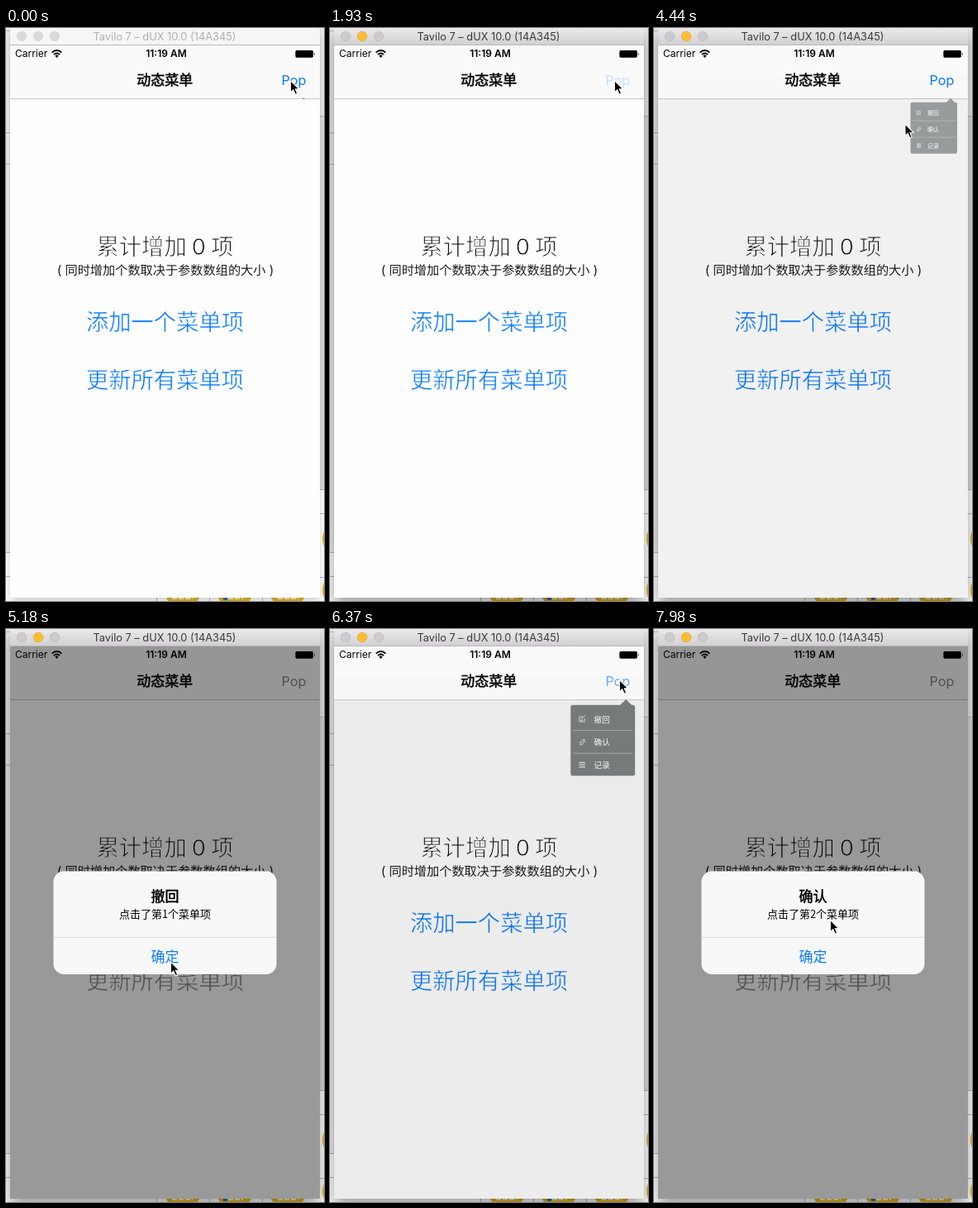
Animation, 385 px wide and 692 px high, one loop 8 s. Source, as an HTML page:

```html
<!DOCTYPE html>
<html lang="zh">
<head>
<meta charset="utf-8">
<title>动态菜单</title>
<style>
html, body { margin: 0; width: 100%; height: 100%; overflow: hidden; background: #e6e6e6; }
svg { display: block; font-family: "Noto Sans CJK SC", "Noto Sans CJK", sans-serif; }
text { white-space: pre; }
.mid { text-anchor: middle; }
.latin { font-family: Inter, "Liberation Sans", sans-serif; }
/* a page-coloured outline thins the strokes to a light weight */
.light { font-size: 27.3px; stroke: #fefefe; stroke-width: .55; }
.thin { stroke-width: .95; }
.semibold { font-size: 17px; stroke: #000; stroke-width: .5; }
</style>
</head>
<body>
<svg width="385" height="692" viewBox="0 0 385 692">
  <defs>
    <linearGradient id="bar" x2="0" y2="1">
      <stop stop-color="#ebe9eb"/><stop offset="1" stop-color="#d2d0d2"/>
    </linearGradient>
  </defs>

  <!-- desktop behind the window -->
  <rect width="385" height="692" fill="#ececec"/>
  <path fill="#dedede" d="M380 107h5v450h-5z"/>
  <path fill="#fff" d="M182 558h203v134H182zM0 634h182v58H0z"/>
  <g id="badges" fill="#e5b622"></g>
  <path stroke="#b4b4b4" fill="none" d="M0 3.5h5M0 126.5h5M0 164.5h5M0 633.5h5M0 662.5h5M380 106.5h5M380 557.5h5M380 586.5h5M380 663.5h5M182.5 688v4M246.5 688v4M310.5 688v4"/>

  <!-- window -->
  <path id="frame" d="M5 4q0-4 4-4h367q4 0 4 4v684H5z" fill="#fefefe"/>
  <path id="titleBar" d="M5 20V4q0-4 4-4h367q4 0 4 4v16z"/>
  <path d="M5 20.5h375" stroke="#b8b8b8"/>
  <g stroke-width=".6">
    <circle class="dot" cx="19" cy="10" r="5.8"/>
    <circle class="dot" cx="39" cy="10" r="5.8"/>
    <circle class="dot" cx="59" cy="10" r="5.8"/>
  </g>
  <text id="winTitle" class="latin mid" x="192" y="14.7" font-size="12.8">Tavilo 7 – dUX 10.0 (14A345)</text>

  <!-- navigation and status bars -->
  <path fill="#fafafa" d="M5 21h375v64H5z"/>
  <path d="M5 85.5h375" stroke="#c6c6c8"/>
  <text class="latin" x="11" y="35.3" font-size="12">Carrier</text>
  <text class="latin mid" x="194" y="35.3" font-size="12" font-weight="600">11:19 AM</text>
  <g fill="none" stroke="#000" stroke-width="1.8">
    <path d="M55.6 29.6q5.9-5.2 11.8 0M57.9 32q3.6-3 7.2 0"/>
    <path fill="#000" stroke="none" d="M59.4 33.4q2.1-1.6 4.2 0L61.5 36z"/>
  </g>
  <rect x="350.4" y="27" width="21.6" height="8.8" rx="1.8"/>
  <path d="M373 29.6q1.8 1.8 0 3.6z"/>
  <text class="semibold mid" x="192.3" y="69.3">动态菜单</text>

  <!-- page -->
  <text class="light thin mid" x="192.5" y="274.2">累计增加 <tspan class="latin">0</tspan> 项</text>
  <text class="latin mid" x="193" y="297.8" font-size="15.2" fill="#1c1c1c">( 同时增加个数取决于参数数组的大小 )</text>
  <g id="tinted">
    <text id="pop" class="latin" x="333.5" y="69" font-size="16.2">Pop</text>
    <text class="light mid" x="192.5" y="365.2">添加一个菜单项</text>
    <text class="light mid" x="192.5" y="435.2">更新所有菜单项</text>
  </g>

  <!-- popover -->
  <g id="shade">
    <path d="M5 86h375v602H5z" fill-opacity=".1"/>
    <path d="M5 57h375v28H5z" fill-opacity=".015"/>
  </g>
  <g id="menu">
    <path fill="#42484a" d="M264 95h83l10-10 10 10h2q4 0 4 4v116q0 4-4 4H264q-4 0-4-4V99q0-4 4-4z"/>
    <path d="M264 139.5h105M264 179.5h105" stroke="#a3a7a9"/>
    <g fill="none" stroke="#fff">
      <path d="M282 115.5h-6.5v9h9v-6M279 121l1-2.5 5.5-5M277 122h5"/>
      <path d="M275 160.5h2.5l3.5-5h4l-3 4.5M286 159.500h-2.500l-3.500 5h-4l3-4.500" stroke-width=".9"/>
      <path d="M275 195.7h10.5M275 199.7h10.5M275 203.7h10.5" stroke-width="1.5"/>
    </g>
    <g fill="#fff" font-size="14">
      <text x="301" y="125.4">撤回</text>
      <text x="301" y="165.4">确认</text>
      <text x="301" y="205.4">记录</text>
    </g>
  </g>

  <!-- alert -->
  <path id="dim" d="M5 21h375v667H5z"/>
  <g id="alert">
    <rect x="57.5" y="292.5" width="270" height="124.5" rx="12.5" fill="#f8f8f8"/>
    <path d="M57.5 372.5h270" stroke="#dcdcdc"/>
    <text id="alertTitle" class="semibold mid" x="192.5" y="328.8"></text>
    <text id="alertText" class="mid" x="192.5" y="349" font-size="13"></text>
    <text class="mid" x="192.5" y="401.5" font-size="17" fill="#087aff">确定</text>
  </g>

  <path id="cursor" d="M0 0V14.2L3.3 11.2 5.7 16.8 8.2 15.7 5.9 10.3H10.4Z" stroke="#fff" stroke-width="1.1"/>
</svg>

<script>
const LOOP = 8000, STEP = 147.8;
const $ = id => document.getElementById(id);
const set = (el, attrs) => { for (const a in attrs) el.setAttribute(a, attrs[a]); };
const mix = (a, b, p) => a + (b - a) * p;

// [step it opens, amount shown at that step, step it starts closing]
const menuTimes = [[0, .01, 9], [14, .3, 18], [23, .255, 30], [43, .69, 51]];
const alertTimes = [[32, .5, 37], [53, .5, 60]];

// [step, value...]
const popAlpha = [[0, 1], [12, 1], [13, .2], [16, 1], [20, 1], [21, .2], [22, .2],
  [25, 1], [41, 1], [42, .2], [44, 1]];
const pointer = [[0, 344.5, 63.5], [25, 344.5, 63.5], [28, 304, 116], [32, 304, 116],
  [35, 199.5, 402], [38, 199.5, 402], [41, 350.5, 61.5], [44, 350.5, 61.5],
  [45, 347, 90], [46, 301, 224], [48, 304, 160], [51, 304, 160], [54, 213.5, 351.5]];

const shown = (times, k) => Math.max(0, ...times.map(([open, first, close]) =>
  Math.min(1, first + .72 * (k - open), 1 - .5 * (k - close + 1))));

function track(keys, k) {
  const i = keys.findIndex(key => key[0] > k);
  if (i < 0) return keys.at(-1).slice(1);
  const a = keys[i - 1], b = keys[i], p = (k - a[0]) / (b[0] - a[0]);
  return a.slice(1).map((v, j) => mix(v, b[j + 1], p));
}

for (const y of [617, 679])
  for (const x of [214, 277, 341, 405])
    $('badges').innerHTML += `<circle cx="${x}" cy="${y}" r="22"/>`;
$('badges').innerHTML += '<path d="M201 689h25M269 689h18M329 689h25" stroke="#fff3c4" stroke-width="2" stroke-dasharray="6 2"/>' +
  '<path d="M263 688h5v3h-5z" fill="#2a6fd0"/>';

function draw(t) {
  const k = Math.floor((t + 10) / STEP);
  const active = k > 0;
  const menu = shown(menuTimes, k), alert = shown(alertTimes, k);

  set($('titleBar'), { fill: active ? 'url(#bar)' : '#f6f6f6' });
  set($('winTitle'), { fill: active ? '#3a3a3a' : '#b0b0b0' });
  $('frame').style.filter = active
    ? 'drop-shadow(0 8px 9px rgba(0,0,0,.4))' : 'drop-shadow(0 4px 5px rgba(0,0,0,.2))';
  document.querySelectorAll('.dot').forEach((dot, i) => set(dot, active && i == 1
    ? { fill: '#fdbd2f', stroke: '#dfa032' }
    : { fill: active ? '#cdcbcd' : '#dadada', stroke: active ? '#b9b7b9' : '#d0d0d0' }));

  const tint = [8, 122, 255].map(c => Math.round(mix(c, 132, alert)));
  set($('tinted'), { fill: `rgb(${tint})` });
  set($('pop'), { opacity: track(popAlpha, k)[0] });

  set($('shade'), { opacity: menu });
  set($('menu'), { opacity: menu > .02 ? menu : menu && 1,
    transform: `translate(361 84.6) scale(${menu}) translate(-361 -84.6)` });

  const second = k > 45;
  $('alertTitle').textContent = second ? '确认' : '撤回';
  $('alertText').textContent = `点击了第${second ? 2 : 1}个菜单项`;
  set($('dim'), { opacity: .4 * alert });
  const zoom = k < 37 || second ? mix(1.2, 1, alert) : 1;
  set($('alert'), { opacity: alert,
    transform: `translate(192.5 355) scale(${zoom}) translate(-192.5 -355)` });

  set($('cursor'), { transform: `translate(${track(pointer, k)})` });
}

const start = performance.now();
function tick() {
  draw((performance.now() - start) % LOOP);
  requestAnimationFrame(tick);
}
tick();
</script>
</body>
</html>
```
